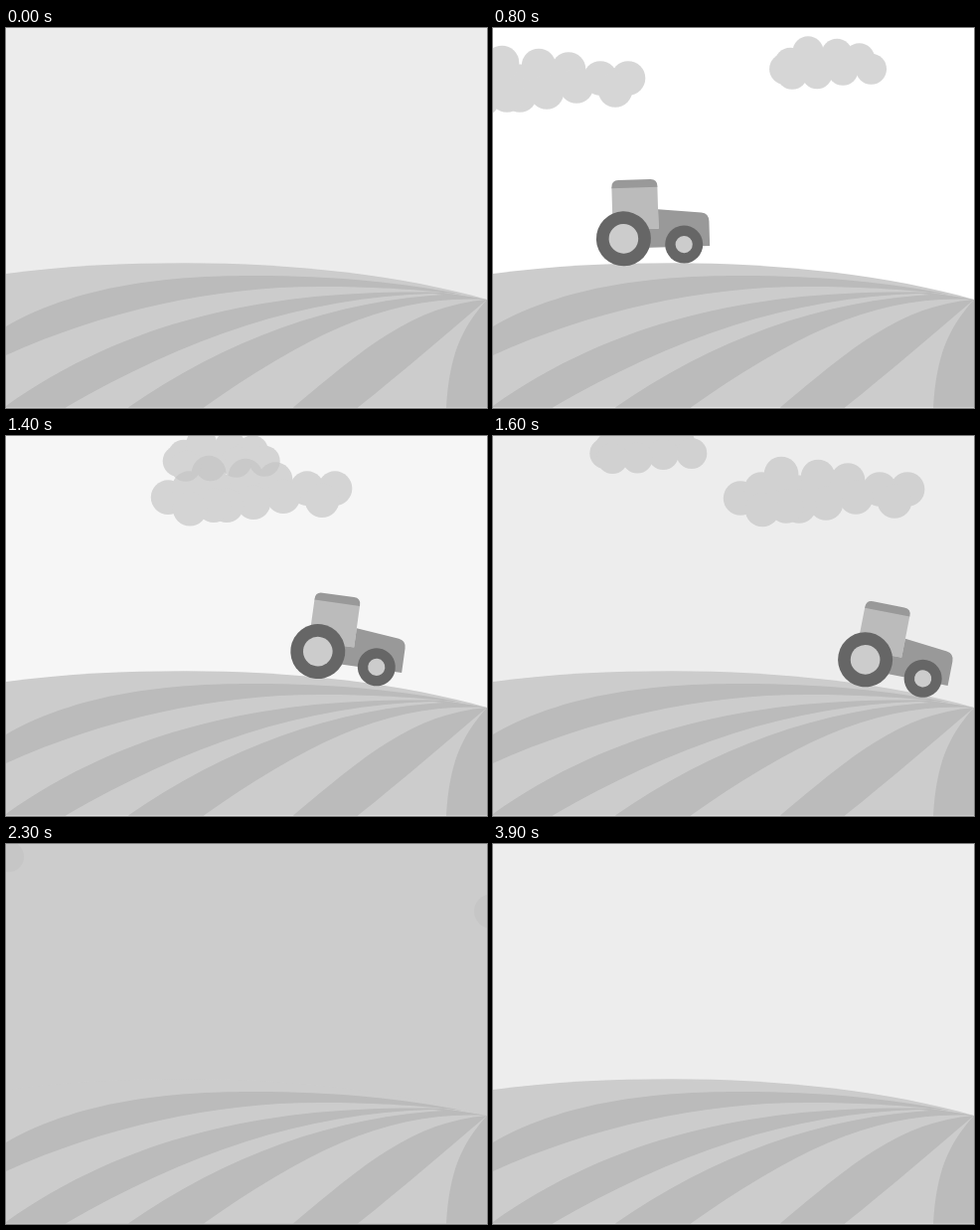
Recreate the animation shown at these times as an HTML page. Size 484 px wide and 382 px high, loop 4000 ms.

```html
<!DOCTYPE html>
<html lang="en">
<head>
<meta charset="utf-8">
<title>Tractor on a hill</title>
<style>
  html, body { margin: 0; width: 100%; height: 100%; overflow: hidden; }
  svg { display: block; width: 484px; height: 382px; }
  .cloud { fill: #c4c4c4; opacity: .68; }
  #big { marker: url(#puff-big); }
  #small { marker: url(#puff-small); }
</style>
</head>
<body>
<svg viewBox="0 0 484 382">
  <!-- A puff sits on every corner of a cloud path -->
  <marker id="puff-big" markerUnits="userSpaceOnUse" overflow="visible"><circle r="17.300" fill="#c4c4c4"/></marker>
  <marker id="puff-small" markerUnits="userSpaceOnUse" overflow="visible"><circle r="15.500" fill="#c4c4c4"/></marker>

  <rect id="sky" width="484" height="382" fill="#ececec"/>
  <path id="big" class="cloud" d="M86 61 L107 52 L127 36.500 L164 39.500 L194 43 L226 52 L254 52 L241 64 L202 60 L172 66 L145 69 L132 69 L108 72.500"/>
  <path id="small" class="cloud" d="M294.500 42 L300 36 L318 24.500 L347 27 L369.500 31.500 L381.500 42 L353 43 L327 46.500 L302 47"/>

  <path fill="#ccc" d="M0 247 C60 239 120 236.300 180 236.300 C290 236.300 400 249 484 273 V381.500 H0Z"/>
  <g fill="#bbb">
    <path d="M0 300 C80 254 180 249 250 249 C330 249 400 256 460 268 C400 261 350 260 315 260 C210 260 100 284 0 329Z"/>
    <path d="M0 380 C130 288 280 262 440 266 L484 273 L430 267 C300 270 180 312 60 381.500 H0Z"/>
    <path d="M123 381.500 C220 314 330 273 448 267.500 L484 273 C387 268 307 306 199 381.500Z"/>
    <path d="M289 381.500 C360 322 410 279 484 273 C440 310 400 345 354 381.500Z"/>
    <path d="M443 381.500 C446 331 457 303 484 273 V381.500Z"/>
  </g>

  <g id="tractor">
    <path fill="#bbb" d="M-10.500 -52 H35.500 V-9 H10 V0 H-10.500Z"/>
    <path fill="#999" d="M-10.500 -51 V-52 Q-10.500 -59 -3.500 -59 H28.500 Q35.500 -59 35.500 -52 V-51Z"/>
    <path fill="#999" d="M10 -9 H35.500 V-28.500 L79 -24 Q86.500 -23 86.500 -15 V9.700 H10Z"/>
    <g fill="#666"><circle r="27.500"/><circle cx="60.600" cy="7.500" r="19"/></g>
    <g fill="#ccc"><circle r="14.800"/><circle cx="60.600" cy="7.500" r="8.600"/></g>
  </g>
</svg>
<script>
const $ = id => document.getElementById(id);
const STEP = 100, LOOP = 4000;
const ENTER = 2, NOON = 8, DUSK = 21, DAWN = 37;   // in steps

function skyGrey(s) {
  if (s < NOON) return 236 + 19 * Math.max(0, s - 1) / (NOON - 1);
  if (s < DUSK) return 255 - 51 * ((s - NOON) / (DUSK - NOON)) ** 2.2;
  return s < DAWN ? 204 : s < DAWN + 2 ? 221 : 237;
}

// Drifts right, easing in and out
function bigCloud(s) {
  const t = s - 12;
  return [35.9 * t + 1.41 * t ** 2 - .048 * t ** 3, .3 * t + .0055 * t ** 3];
}

// Drifts left, gaining speed while it rises
function smallCloud(s) {
  const u = (s - ENTER) / (DUSK - ENTER);
  return [35 - 414 * u ** 2.12, -29.5 / (1 + Math.exp((13.6 - s) / 1.5))];
}

// Steady drive over a crest that is steeper on its right side
function tractor(s) {
  const x = 30.4 * (s - ENTER) - 51, dx = x - 197;
  return [x, 210.3 + (dx < 0 ? .00036 : .00046) * dx ** 2, 1.6 * (s - NOON) - 1.7];
}

function place(id, [x, y, turn = 0], on) {
  $(id).setAttribute('transform', `translate(${x} ${y}) rotate(${turn})`);
  $(id).setAttribute('visibility', on ? 'visible' : 'hidden');
}

const start = performance.now();
function draw() {
  const s = Math.floor((performance.now() - start) % LOOP / STEP);
  const grey = Math.round(skyGrey(s));
  $('sky').setAttribute('fill', `rgb(${grey},${grey},${grey})`);
  const on = s >= ENTER && s < DAWN;
  const pose = Math.min(Math.max(s, ENTER), DUSK);
  place('big', bigCloud(pose), on);
  place('small', smallCloud(pose), on);
  place('tractor', tractor(pose), on);
  requestAnimationFrame(draw);
}
draw();
</script>
</body>
</html>
```
